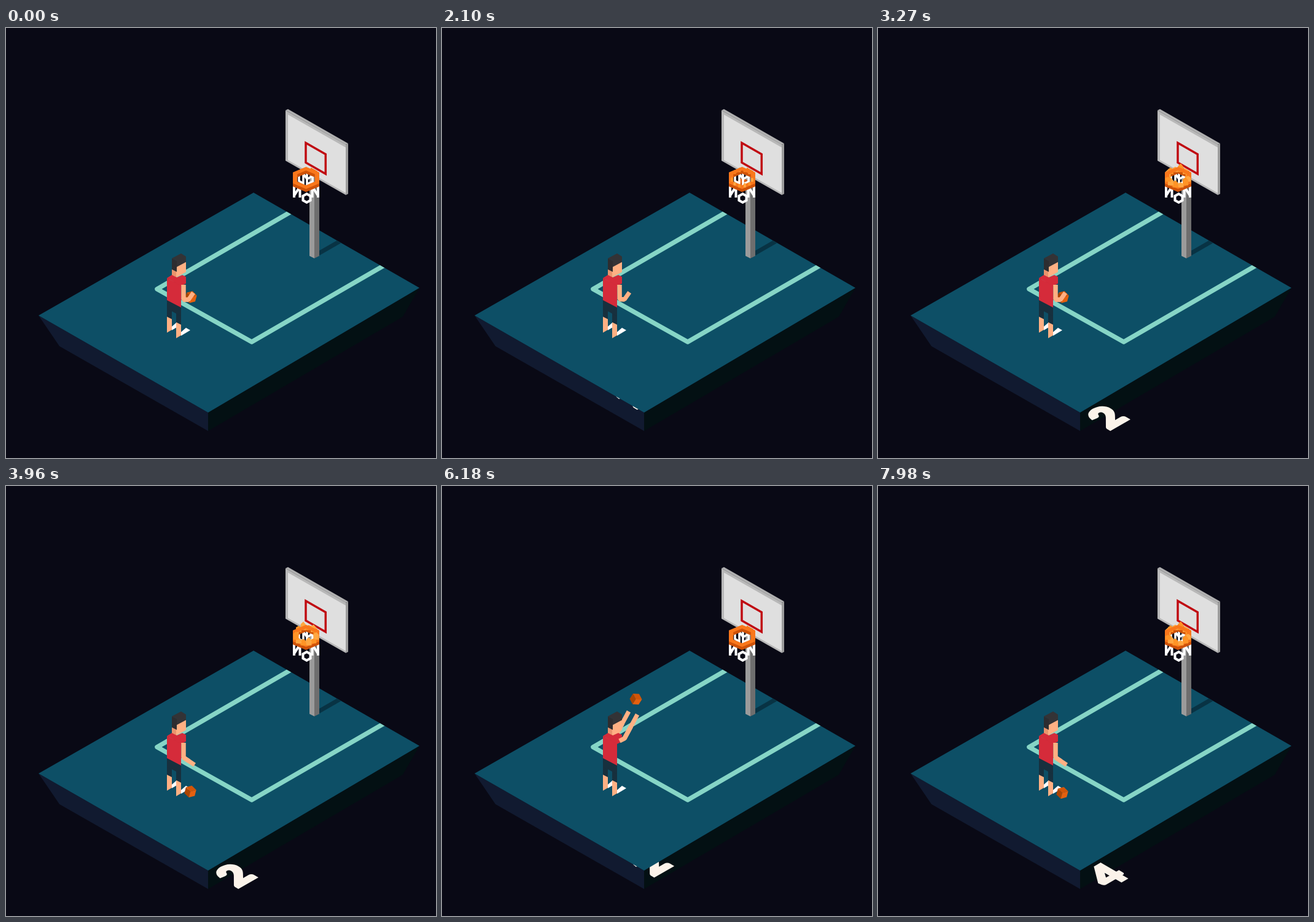
These frames come from a looping animation (700 by 700 pixels, 8000 ms). An HTML page with a canvas:

```html
<!DOCTYPE html>
<html lang="en">
<head>
<meta charset="utf-8">
<title>Free throws</title>
<style>
  html, body { margin: 0; width: 100%; height: 100%; overflow: hidden; background: #090915; }
  canvas { display: block; width: 100vw; height: 100vh; }
</style>
</head>
<body>
<canvas id="court" width="700" height="700"></canvas>
<script>
const ctx = document.getElementById('court').getContext('2d');
const LOOP = 8000;
const SKIN = '#ffb083', RED = '#d52b3a', HAIR = '#333336', SHORTS = '#17303e';

// ---------- shapes ----------
const path = points => new Path2D('M' + points + 'Z');
const fill = (color, shape, rule = 'nonzero') => {
  ctx.fillStyle = color;
  ctx.fill(shape, rule);
};
const poly = (color, points) => fill(color, path(points));
const line = (color, width, d, join = 'miter') => {
  ctx.strokeStyle = color;
  ctx.lineWidth = width;
  ctx.lineJoin = join;
  ctx.stroke(new Path2D(d));
};
// Parallelogram with upright sides, the basic face of the isometric view.
const slabPoints = (x, y, w, h, slope) =>
  `${x},${y} ${x + w},${y + w * slope} ${x + w},${y + w * slope + h} ${x},${y + h}`;
const slab = (color, ...box) => poly(color, slabPoints(...box));
const hexCorner = (x, y, rx, ry, i, turn = 0) => {
  const a = turn + (i * 2 - 3) * Math.PI / 6;
  return `${x + rx * Math.cos(a)},${y + ry * Math.sin(a)}`;
};
const hex = (...args) => [0, 1, 2, 3, 4, 5].map(i => hexCorner(...args, i)).join(' ');

// ---------- easing ----------
const clamp = u => Math.max(0, Math.min(1, u));
const mix = (a, b, u) => a + (b - a) * u;
const progress = (t, start, length) => clamp((t - start) / length);
const quadIn = u => u * u;
const quadOut = u => u * (2 - u);
const smooth = u => u * u * (3 - 2 * u);
const backIn = u => u * u * (2.1 * u - 1.1);
const slide = (from, to, curve) => u => [mix(from[0], to[0], curve(u)), mix(from[1], to[1], curve(u))];
const hop = (from, to, height) => u =>
  [mix(from[0], to[0], u), mix(from[1], to[1], u) - 4 * height * u * (1 - u)];

// ---------- motion ----------
const HELD = [301, 438], FLOOR = [300, 500], FACE = [301, 393], RELEASE = [315, 348];
const TOP = [489, 205], UNDER_RIM = [489, 391], BOUNCE = [356, 468];
const HAND = { hold: [305, 431], down: [307, 454], face: [310, 394], up: [318, 372] };
const ROUNDS = [
  { start: 120, shot: 1643, roll: 702, rest: 205, bounces: 3 },
  { start: 4920, shot: 6180, roll: 480, rest: 0, bounces: 2 }
];
const arc = u => {
  const x = mix(RELEASE[0], TOP[0], u);
  return [x, 201 + .00653 * (x - 465) ** 2];
};

const ballMoves = [], handMoves = [];
const add = (list, start, length, at) => list.push({ start, length, at });
const moveHand = (start, length, from, to) =>
  add(handMoves, start, length, slide(HAND[from], HAND[to], smooth));
const dribble = (t, length) => {
  add(ballMoves, t, length / 2, slide(HELD, FLOOR, quadIn));
  add(ballMoves, t + length / 2, length / 2, slide(FLOOR, HELD, quadOut));
  moveHand(t, length * .4, 'hold', 'down');
  moveHand(t + length * .6, length * .4, 'down', 'hold');
};

add(ballMoves, 0, 1, () => HELD);
add(handMoves, 0, 1, () => HAND.hold);
for (const { start, shot, roll, rest, bounces } of ROUNDS) {
  const land = shot + 580, bounce = land + roll, caught = bounce + roll * .42;
  dribble(start, 240);
  dribble(start + 740, 240);
  add(ballMoves, shot - 280, 100, slide(HELD, FACE, smooth));
  add(ballMoves, shot - 80, 80, slide(FACE, RELEASE, quadIn));
  add(ballMoves, shot, 330, arc);
  add(ballMoves, shot + 330, 250, slide(TOP, UNDER_RIM, quadIn));
  add(ballMoves, land, roll, hop(UNDER_RIM, BOUNCE, 32));
  add(ballMoves, bounce, caught - bounce, hop(BOUNCE, HELD, 10));
  moveHand(shot - 280, 100, 'hold', 'face');
  moveHand(shot - 80, 70, 'face', 'up');
  moveHand(shot + 170, 310, 'up', 'hold');
  moveHand(land + roll * .56, roll * .5, 'hold', 'down');
  moveHand(caught - roll * .3, roll * .3, 'down', 'hold');
  for (let i = 0; i < bounces; i++) dribble(caught + rest + i * 360, 360);
}

// The latest move that has begun decides the place.
const placeAt = (moves, t) => {
  const m = moves.filter(move => move.start <= t).pop();
  return m.at(progress(t, m.start, m.length));
};

// ---------- scene ----------
const GROUND = '53,468 403,268 673,423 329,626';

function drawScore(t) {
  const leaving = t >= 4000 && t < 6400;
  const entered = t < 4000 ? 2000 : 6540;
  const away = leaving ? backIn(progress(t, 5800, 530)) : backIn(1 - progress(t, entered, 530));
  if (away >= 1) return;
  const digit = t < 6400 ? '2' : '4';
  ctx.save();
  ctx.transform(.866, -.5, .866, .5, 393 - 154 * away, 645.5 - 88 * away);
  ctx.font = '900 66px Lato, sans-serif';
  ctx.textAlign = 'center';
  ctx.fillStyle = ctx.strokeStyle = '#fbf3ea';
  ctx.lineWidth = 4;
  ctx.lineJoin = 'miter';
  ctx.fillText(digit, 0, 0);
  ctx.strokeText(digit, 0, 0);
  ctx.restore();
}

function drawCourt(t) {
  ctx.fillStyle = '#090915';
  ctx.fillRect(0, 0, 700, 700);
  poly('#111a30', '53,468 329,626 329,656 87,518');
  poly('#031013', '329,626 673,423 646,470 329,656');
  drawScore(t);
  poly('#0d4f66', GROUND);
  ctx.save();
  ctx.clip(path(GROUND));
  line('#86d5c6', 7.5, 'M478 291 L246 425 L400 511 L632 377', 'round');
  slab('#083344', 502, 367, 50, 8, -.577);
  ctx.restore();
}

function drawBoard() {
  slab('#9b9b9b', 494, 235, 8, 136, .5);
  slab('#6e6e6e', 502, 239, 8, 136, -.5);
  slab('#b8b8b8', 455, 134, 98, 82, .57);
  poly('#b0b0b0', '455,134 459,132 557,188 553,190');
  slab('#9d9d9d', 553, 190, 4, 82, -.5);
  slab('#dfdfdf', 459, 141, 94, 74, .57);
  line('#c00b12', 3.5, `M${slabPoints(488, 187, 32.3, 32, .575)}Z`);
}

function drawNet() {
  line('#fff', 3.5, 'M477 239 V249 L484 253 V237 L490 246 L499 241 V250 L490 254 V236');
  // One half, mirrored about the middle of the rim.
  for (const side of [-1, 1]) {
    ctx.save();
    ctx.translate(488.5, 0);
    ctx.scale(side, 1);
    line('#fff', 4, 'M19.5 252 V276 M19.5 273 L10 258 V276');
    ctx.restore();
  }
  line('#fff', 4, `M${hex(489.5, 277, 7, 7)}Z`);
}

function drawFlames(t, power, front) {
  for (let i = 0; i < 12; i++) {
    const angle = (i + .5) * Math.PI / 6;
    if ((Math.sin(angle) > 0) !== front) continue;
    const x = 488.5 + 17 * Math.cos(angle);
    const y = 244 + 13 * Math.sin(angle);
    const h = power * (8 + 3 * Math.sin(t / 75 + i * 2.3));
    const w = 4.5 * power;
    poly(i % 2 ? '#ff9426' : '#ffa741',
      `${x - w},${y + 3} ${x - w},${y - h * .6} ${x},${y - h} ${x + w},${y - h * .5} ${x + w},${y + 3}`);
  }
}

function drawHoop(t, power) {
  const ring = y => path(`${hex(488.5, y, 24.8, 18)}Z M${hex(488.5, y, 16.5, 12)}`);
  slab('#f47a1d', 496, 227, 11, 9, .55);
  drawNet();
  fill('#cf5208', ring(249), 'evenodd');
  drawFlames(t, power, false);
  fill('#f9771b', ring(244), 'evenodd');
  drawFlames(t, power, true);
}

function drawBall([x, y]) {
  const turn = (x - 392) * .02;
  ['#ab4503', '#d35508', '#e4600f'].forEach((color, i) => {
    const corners = [-1, 0, 1].map(k => hexCorner(x, y, 10, 10, i * 2 + k, turn));
    poly(color, `${x},${y} ${corners.join(' ')}`);
  });
}

// The elbow lifts with the hand; the wrist bends only while the hand is low.
function drawArm([x, y], dx = 0, dy = 0) {
  const raise = clamp((431 - y) / 59);
  const bend = 6 * clamp((454 - y) / 23) * (1 - raise);
  const elbow = [289 + 8 * raise, 442 - 31 * raise];
  const wrist = [(elbow[0] + x) / 2, (elbow[1] + y) / 2 + bend];
  ctx.save();
  ctx.translate(dx, dy);
  line(SKIN, 7.5, `M289 ${418 - 3 * raise} L${elbow} L${wrist}`, 'bevel');
  line(SKIN, 7, `M${elbow} L${wrist} L${x} ${y}`, 'bevel');
  ctx.restore();
}

function drawLeg(x, y) {
  poly('#fff', `${x + 8},${y + 20} ${x + 16},${y + 13} ${x + 23},${y + 17} ${x + 8},${y + 26}`);
  slab(SKIN, x, y, 8, 30, -.6);
  slab(SHORTS, x, y - 20, 8, 24, .5);
}

function drawBody() {
  drawLeg(262, 466);
  drawLeg(277, 475);
  slab(SHORTS, 262, 442, 23, 15, .52);
  slab('#e9946d', 270, 391, 8, 12, .5);
  slab(SKIN, 277, 388, 16, 18, -.55);
  slab(RED, 262, 407, 23, 36, .52);
  poly(RED, '262,407 270,402 278,406 287,402 293,405 293,416 285,420');
  slab('#2d2d30', 270, 375, 8, 18, .5);
  poly(HAIR, '270,375 285,367 293,372 293,381 278,389 278,379');
}

function drawFrame(t) {
  const ball = placeAt(ballMoves, t);
  const hand = placeAt(handMoves, t);
  const falling = ROUNDS.some(r => t > r.shot + 370 && t < r.shot + 580);
  const power = t < 4800
    ? progress(t, 2013, 200) * (1 - progress(t, 4500, 240))
    : progress(t, 6550, 200);

  drawCourt(t);
  drawBoard();
  if (falling) drawBall(ball);
  drawHoop(t, power);
  if (hand[1] < 420) drawArm(hand, -14, -5);
  drawBody();
  if (!falling) drawBall(ball);
  drawArm(hand);
}

const start = performance.now();
function tick() {
  drawFrame((performance.now() - start) % LOOP);
  requestAnimationFrame(tick);
}
tick();
</script>
</body>
</html>
```
